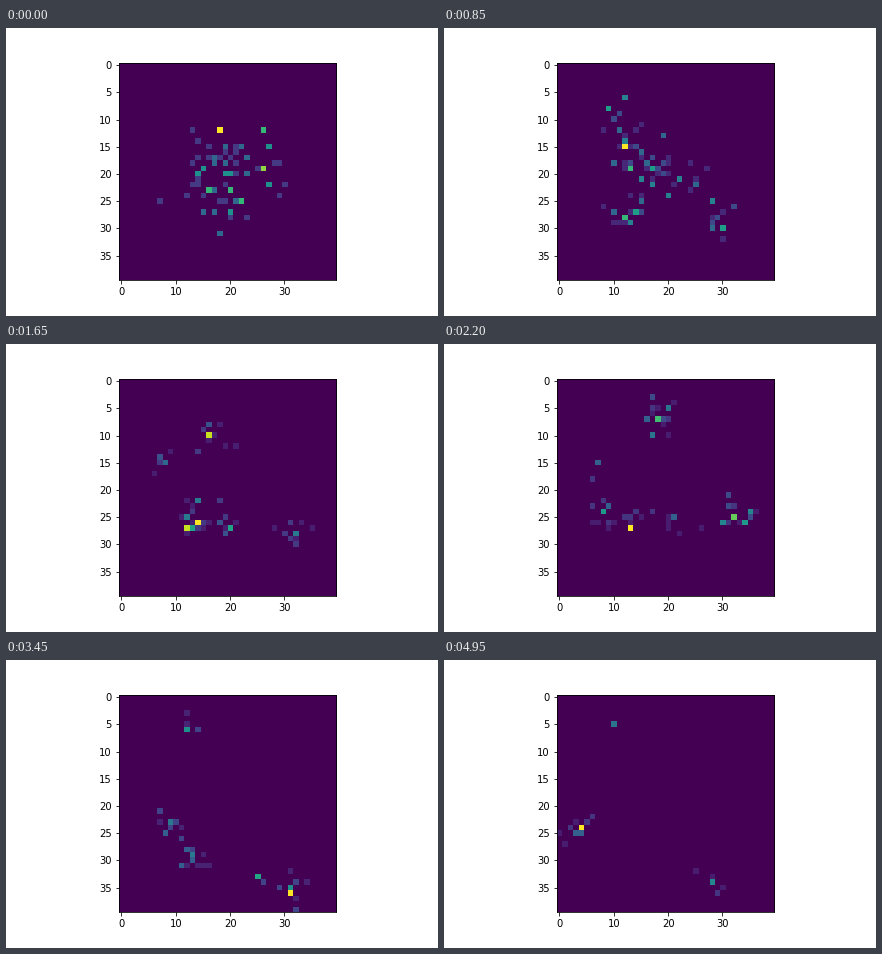
These frames come from a looping animation (432 px wide and 288 px high, 5000 ms). A matplotlib script:

```python
import numpy as np
import matplotlib.pyplot as plt
from matplotlib.animation import FuncAnimation

SIZE = 40
FRAMES = 100
HOME = np.array([20, 20])
FOLLOWERS = 24  # per colony at the start
rng = np.random.default_rng(7)
times = np.arange(FRAMES)

# Places a colony's founder passes at these frames; later ones may be missing.
KEY_TIMES = [0, 17, 33, 57, 69, 84, 99]
ROUTES = {
    "north": [(15, 19), (9, 8), (16, 10), (16, 7), (12, 6), (10, 5), (10, 5)],
    "west": [(16, 23), (12, 15), (8, 15)],
    "southwest": [(21, 25), (12, 28), (14, 26), (10, 25), (9, 23), (6, 22),
                  (4, 24)],
    "inner": [(20, 17), (17, 19), (12, 27), (12, 27), (13, 29), (7, 27),
              (3, 25)],
    "south": [(23, 28), (22, 21), (20, 27), (23, 32), (25, 33)],
    "east": [(30, 22), (30, 30), (32, 28), (33, 33), (31, 36), (31, 37),
             (28, 34)],
}
LIFE = {"north": 100, "west": 50, "south": 80}
LONG_LIFE = 140

# The colony with the most offspring, and when the lead passes on.
LEADERS = ["west", "southwest", "east", "southwest"]
LEAD_CHANGES = [25, 45, 76]


def settle(rate):
    return 1 - np.exp(-times / rate)


spread = 5.2 - 3.6 * settle(10)
largest = np.rint(4 + 6 * settle(10)).astype(int)
leader = [LEADERS[i] for i in np.searchsorted(LEAD_CHANGES, times)]


def interpolate(keys, points):
    points = np.asarray(points, float)
    return np.column_stack([np.interp(times, keys, p) for p in points.T])


def founder_path(route):
    """Random walk pinned to the points of the route."""
    keys = KEY_TIMES[:len(route)]
    walk = rng.normal(0, 1, (FRAMES, 2)).cumsum(axis=0)
    return interpolate(keys, route) + walk - interpolate(keys, walk[keys])


def wander():
    """Unit-variance drift around the centre of a colony."""
    drift = rng.normal(0, 1, (FRAMES, 2))
    for t in times[1:]:
        drift[t] = 0.8 * drift[t - 1] + 0.6 * drift[t]
    return drift


def mark(grid, place, count):
    x, y = np.rint(place).astype(int) % SIZE
    grid[y, x] += count


def add_colony(grids, name, route):
    founder = founder_path(route)
    centre = HOME + (founder - HOME) * settle(8)[:, None]
    life = LIFE.get(name, LONG_LIFE)
    alive = FOLLOWERS * (1 - (times / life) ** 2)

    for t in times[:life]:
        count = largest[t] // 2 - 2 + rng.geometric(0.55)
        if leader[t] == name:
            count = largest[t]
        mark(grids[t], founder[t], min(count, largest[t]))

    for i in range(FOLLOWERS):
        path = centre + wander() * spread[:, None]
        for t in times[alive > i]:
            offspring = rng.geometric(0.55) - 1
            mark(grids[t], path[t], min(offspring, largest[t]))


grids = np.zeros((FRAMES, SIZE, SIZE))
for name, route in ROUTES.items():
    add_colony(grids, name, route)

fig, ax = plt.subplots(figsize=(6, 4), dpi=72, facecolor="white")
fig.subplots_adjust(left=0.125, right=0.9, bottom=0.125, top=0.88)
image = ax.imshow(grids[0], cmap="viridis", interpolation="nearest")
ax.set_xticks(range(0, SIZE, 10))
ax.set_yticks(range(0, SIZE, 5))


def draw(i):
    image.set_data(grids[i])
    image.set_clim(0, grids[i].max())
    return [image]


anim = FuncAnimation(fig, draw, frames=FRAMES, interval=50,
                     init_func=lambda: draw(0), repeat=True)
plt.show()
```
